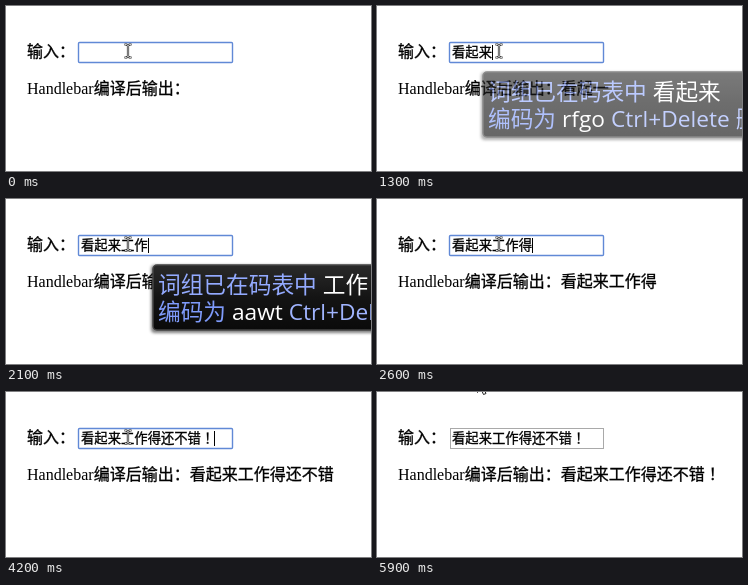
These frames come from a looping animation (365x165 px, 6000 ms). An HTML page:

```html
<!DOCTYPE html>
<html lang="zh-CN">
<head>
<meta charset="utf-8">
<style>
html, body { margin: 0; width: 100%; height: 100%; overflow: hidden; background: #fff; }
svg { display: block; }
text { white-space: pre; }
.page { font: 16px "Liberation Serif", "Noto Sans CJK SC", serif; }
.field { font: 13.333px "Noto Sans CJK SC", sans-serif; }
.field, .cjk { stroke: #000; stroke-width: .3; }
.centred { font-family: "Noto Sans CJK JP", sans-serif; }
.pop { font: 22.7px "Open Sans", "Noto Sans CJK SC", sans-serif; fill: #93aaff; }
.pop .line2 { fill: #7f9bfb; }
.pop .hi { fill: #fff; }
.pop .keys { fill: #a0b4ff; }
</style>
</head>
<body>
<svg width="365" height="165" viewBox="0 0 365 165">
  <defs>
    <linearGradient id="dark" x2="0" y2="1">
      <stop offset="0" stop-color="#2a2a2a"/>
      <stop offset=".5" stop-color="#141414"/>
      <stop offset="1" stop-color="#0a0a0a"/>
    </linearGradient>
    <filter id="soft" x="-5%" y="-10%" width="110%" height="120%"><feGaussianBlur stdDeviation="1.5"/></filter>
  </defs>
  <text class="page cjk" x="21" y="51">输入：</text>
  <rect id="box" fill="#fff"/>
  <text class="field" id="typed" x="75" y="51"></text>
  <path id="underline" stroke="#000"/>
  <rect id="caret" y="39" width="1" height="15"/>
  <text class="page" x="21" y="88">Handlebar<tspan class="cjk" id="output"></tspan></text>
  <g id="ibeam" fill="none">
    <path d="M-3.5-6.5h2l1.5 1 1.5-1h2M0-5.5v11M-3.5 6.5h2l1.5-1 1.5 1h2" stroke="#222" stroke-width="2.2"/>
    <path d="M-3-6.5h1.5l1.5 1 1.5-1h1.5M0-5.5v11M-3 6.5h1.5l1.5-1 1.5 1h1.5" stroke="#fff" stroke-width=".8"/>
  </g>
  <path id="arrow" d="M.5.5v16l3.5-3.5 2.5 5.5 2.5-1-2.5-5.500h5z" fill="#fff" stroke="#222"/>
  <g id="popup" class="pop">
    <rect x="-1" y="1" rx="4" fill="#000" opacity=".5" filter="url(#soft)"/>
    <rect x="1" y="1" rx="4" fill="url(#dark)" stroke="#444" stroke-width="1.5"/>
    <text x="6" y="29"></text>
    <text x="6" y="56" class="line2"></text>
    <text x="6" y="85"></text>
  </g>
</svg>
<script>
const $ = id => document.getElementById(id);
const LOOP = 6000, TEXT = '看起来工作得还不错！';

// time, committed characters, text being composed, output, key code
const steps = [
  [0, 0, '', ''],
  [100, 0, '的', ''],
  [200, 0, '年', '的', 'rh'],
  [300, 0, '看', '看', 'rhf'],
  [500, 1, '', '看'],
  [800, 1, '地', '看地'],
  [900, 1, '直', '看直', 'fh'],
  [1000, 1, '起', '看起', 'fhn'],
  [1100, 2, '', '看起'],
  [1200, 2, '一', '看起一'],
  [1300, 3, '', '看起一'],
  [1400, 3, '', '看起来'],
  [1800, 3, '工', '看起来工'],
  [1900, 4, '', '看起来工'],
  [2000, 4, '人', '看起来工人'],
  [2100, 5, '', '看起来工人'],
  [2200, 5, '', '看起来工作'],
  [2500, 5, '和', '看起来工作和'],
  [2600, 6, '', '看起来工作得'],
  [2700, 6, '还', '看起来工作得还', 'gip'],
  [2800, 7, '', '看起来工作得还'],
  [3100, 7, '不', '看起来工作得还'],
  [3200, 8, '', '看起来工作得还不'],
  [3400, 8, '我', '看起来工作得还不我'],
  [3500, 8, '错', '看起来工作得还不错', 'qaj'],
  [3700, 9, '', '看起来工作得还不错'],
  [4200, 10, '', '看起来工作得还不错'],
  [4400, 10, '', TEXT]
];

// from, to, left edge, phrase, code, opacity
const notices = [
  [1300, 1400, 105, '看起来', 'rfgo', .62],
  [1400, 1500, 105, '看起来', 'rfgo', 1],
  [1500, 1600, 105, '看起来', 'rfgo', .5],
  [2100, 2300, 146, '工作', 'aawt', 1],
  [2300, 2400, 146, '工作', 'aawt', .5],
  [3700, 4200, 199, '还不错', 'ggqa', 1]
];

const set = (el, attrs) => { for (const k in attrs) el.setAttribute(k, attrs[k]); };
const show = (el, on) => el.style.display = on ? '' : 'none';
const span = (name, s) => `<tspan class="${name}">${s}</tspan>`;
// Japanese glyphs set the exclamation mark in the middle of its cell
const centre = s => s.replace('！', '<tspan class="centred" lang="ja">！</tspan>');
const charX = n => Math.round(75 + n * 40 / 3);

function drawPopup(x, width, height, lines, opacity) {
  const popup = $('popup'), [shadow, panel, ...rows] = popup.children;
  set(popup, { transform: `translate(${x} 65)`, opacity });
  set(shadow, { width: width + 4, height: height + 3 });
  set(panel, { width, height });
  rows.forEach((row, i) => row.innerHTML = lines[i] || '');
}

function drawMouse(t) {
  const p = Math.min(1, Math.max(0, (Math.floor(t / 100) * 100 - 4900) / 600));
  const x = 122 - 22 * p, y = 45 - 61 * p, arrow = y < 36;
  show($('ibeam'), !arrow);
  show($('arrow'), arrow);
  set($(arrow ? 'arrow' : 'ibeam'), { transform: `translate(${Math.round(x)} ${Math.round(y)})` });
}

function draw(t) {
  const [, n, pre, out, code] = steps.findLast(s => s[0] <= t);
  const x = charX(n), focused = t < 5800;

  set($('box'), focused
    ? { x: 72.5, y: 36.5, width: 154, height: 20, rx: 1, stroke: '#6189d6', 'stroke-width': 1.4 }
    : { x: 73.5, y: 36.5, width: 153, height: 20, rx: 0, stroke: '#a9a9a9', 'stroke-width': 1 });
  $('typed').innerHTML = centre(TEXT.slice(0, n) + pre);
  $('output').innerHTML = '编译后输出：' + centre(out);
  set($('underline'), { d: pre ? `M${x} 53.5H${charX(n + 1)}` : '' });
  set($('caret'), { x });
  show($('caret'), t >= 100 && t < 4800 || t >= 5300 && focused);

  const note = notices.find(m => t >= m[0] && t < m[1]);
  show($('popup'), note || code);
  if (note) {
    const [, , left, phrase, keys, opacity] = note;
    drawPopup(left, 400, 65, [
      '词组已在码表中 ' + span('hi', phrase),
      `编码为 ${span('hi', keys)} ${span('keys', 'Ctrl+Delete 删除')}`
    ], opacity);
  } else if (code) {
    const other = pre === TEXT[n] ? '' : '2.' + TEXT[n];
    drawPopup(x + 4, 173, 98, [span('hi', code), '1.' + pre, other], 1);
  }
  drawMouse(t);
}

const start = performance.now();
function tick() {
  draw((performance.now() - start) % LOOP);
  requestAnimationFrame(tick);
}
tick();
</script>
</body>
</html>
```
